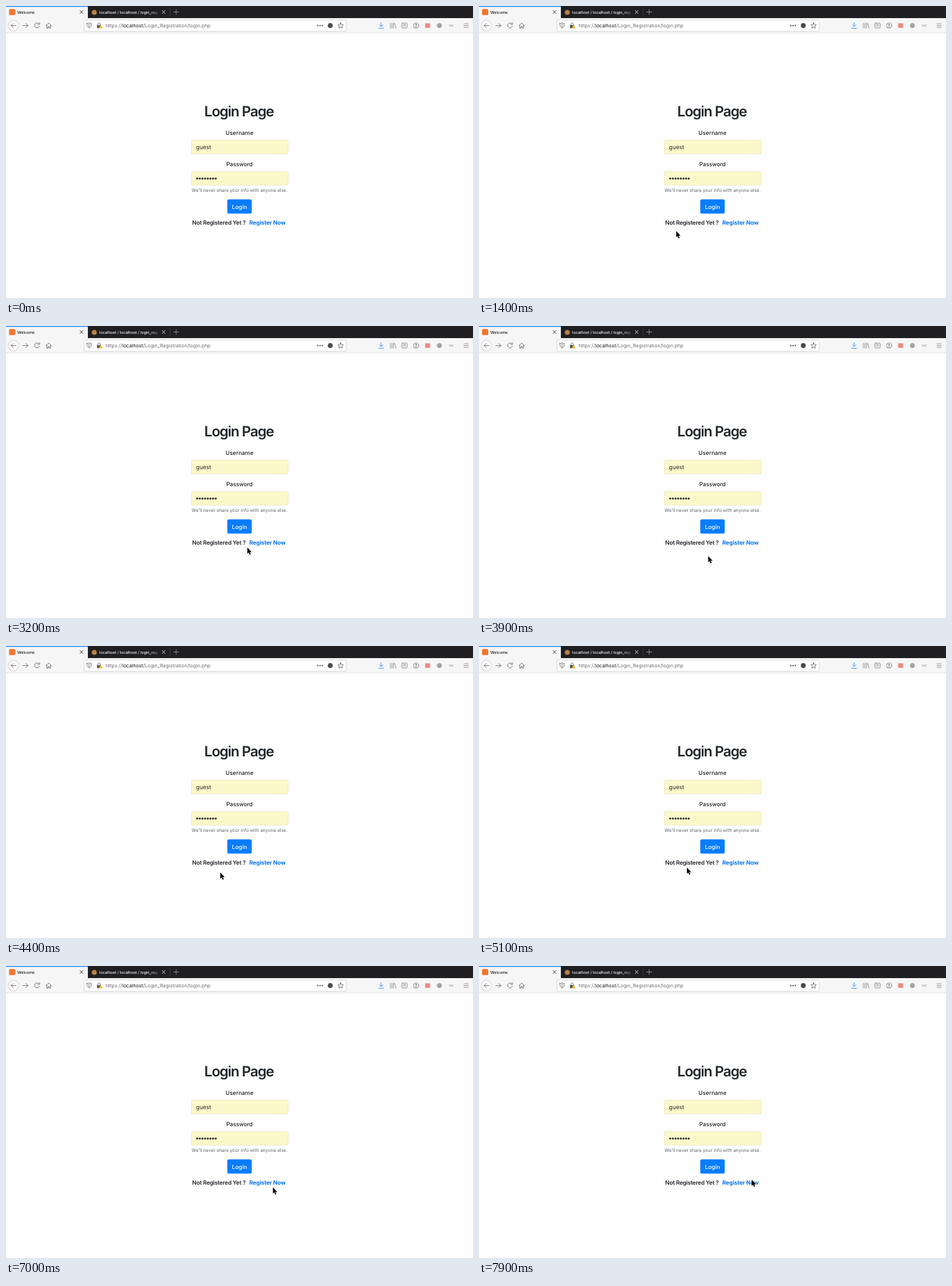
An HTML page for the animation above (8000 ms loop, 656 by 410 pixels).

```html
<!DOCTYPE html>
<html lang="en">
<head>
<meta charset="utf-8">
<title>Login Page</title>
<style>
  html, body { margin: 0; width: 100%; height: 100%; overflow: hidden; background: #fefefe; }
  svg { display: block; width: 100vw; height: 100vh; font-family: Inter, "Open Sans", sans-serif; text-rendering: geometricPrecision; }
  .mid { text-anchor: middle; }
  .line { fill: none; stroke: #66666a; stroke-width: .8; stroke-linecap: round; stroke-linejoin: round; }
  .pale { stroke: #89898d; }
  .field { fill: #fdf8c9; stroke: #e4e0bd; stroke-width: .6; }
</style>
</head>
<body>
<svg viewBox="0 0 656 410" xmlns="http://www.w3.org/2000/svg">
  <defs>
    <linearGradient id="fade" gradientUnits="userSpaceOnUse" x1="203" x2="216">
      <stop offset="0" stop-color="#f4f4f5"/>
      <stop offset="1" stop-color="#f4f4f5" stop-opacity="0"/>
    </linearGradient>
  </defs>
  <rect width="656" height="410" fill="#fefefe"/>

  <!-- tab strip -->
  <rect width="656" height="17" fill="#1f1f21"/>
  <rect width="115" height="17" fill="#f6f6f7"/>
  <rect width="115" height="1.2" fill="#1688f5"/>
  <path d="M230.5 2V15" stroke="#48484b" stroke-width=".6"/>
  <rect x="4.300" y="4.200" width="8.600" height="8.600" rx="1.5" fill="#f2762b"/>
  <circle cx="124" cy="9" r="3.500" fill="#b98242"/>
  <g font-size="5.5" font-weight="500">
    <text x="16" y="10.900" fill="#17171a" letter-spacing="-.03">Welcome</text>
    <text x="131" y="10.900" fill="url(#fade)">localhost / localhost / login_reg</text>
  </g>
  <path class="line" d="M104 6.500l4 4m0-4l-4 4" style="stroke:#222"/>
  <path class="line" d="M219.500 6.500l4 4m0-4l-4 4" style="stroke:#eee"/>
  <path class="line" d="M235.500 8.500h7m-3.500-3.500v7" style="stroke:#aaa;stroke-width:.7"/>

  <!-- toolbar -->
  <rect y="17" width="656" height="21" fill="#f6f6f7"/>
  <path d="M0 38H656" stroke="#dededf" stroke-width=".7"/>
  <circle cx="10.500" cy="27.500" r="7.500" fill="#fbfbfb" stroke="#c3c3c6" stroke-width=".6"/>
  <g class="line">
    <path d="M14 27.500H7.200m3-3l-3 3 3 3"/>
    <path d="M23.500 27.500h7.300m-3-3l3 3-3 3"/>
    <path d="M46.700 25.500a3.500 3.500 0 1 0 .3 2.800M47 23.500v2.300h-2.300"/>
    <path d="M56.200 27.500l3.800-3.600 3.800 3.600M57.300 27v4.200h1.800v-2.400h1.800v2.400h1.800V27"/>
  </g>
  <rect x="109.500" y="19.500" width="368.500" height="16" rx="1.5" fill="#fff" stroke="#cfcfd2" stroke-width=".7"/>
  <g class="line">
    <path d="M113.500 24.500q1.800 0 3.200-.8 1.400.8 3.200.8 0 5-3.200 6.700-3.200-1.700-3.200-6.700z"/>
    <path d="M116.700 25.300v4.200"/>
    <path d="M129 27v-1.400a1.800 1.800 0 0 1 3.600 0V27"/>
  </g>
  <rect x="127.800" y="26.800" width="6" height="4.500" rx=".7" fill="#57575a"/>
  <path d="M133.300 26.500l2.800 5h-5.600z" fill="#f4b000" stroke="#fff" stroke-width=".4"/>
  <text x="140" y="30" font-size="6.850" fill="#6b6b70">https://<tspan fill="#111113">localhost</tspan>/Login_Registration/login.php</text>
  <g fill="#4a4a4e">
    <circle cx="438" cy="27.500" r="1"/><circle cx="441.200" cy="27.500" r="1"/><circle cx="444.400" cy="27.500" r="1"/>
    <circle cx="455.500" cy="27.500" r="3.400"/>
  </g>
  <path id="star" class="line"/>
  <path class="line" d="M527 23.500v5.200m-2.300-2.200l2.300 2.300 2.300-2.300M523.700 31.300h6.600" style="stroke:#4a9df2;stroke-width:1"/>
  <g class="line pale">
    <path d="M540 24v7m2.200-7v7m2.200-7v7m1.400-6.700l2 6.700"/>
    <rect x="556" y="24" width="7.500" height="6.800" rx="1"/>
    <path d="M558 26h3.500m-3.500 2h3.500"/>
    <circle cx="576" cy="27.500" r="3.800"/>
    <circle cx="576" cy="26.500" r="1.200"/>
    <path d="M573.600 30q2.400-2 4.800 0"/>
    <path d="M643.200 25h6.200m-6.200 2.500h6.200m-6.200 2.500h6.200"/>
  </g>
  <rect x="588.800" y="24.300" width="7" height="6.400" fill="#e98a80"/>
  <circle cx="608.800" cy="27.500" r="3.400" fill="#a3a3a7"/>
  <rect x="622" y="26" width="7" height="3" rx="1" fill="#d3d3d6"/>

  <!-- login form -->
  <g class="mid" fill="#212529" font-size="8" font-weight="500">
    <text x="327.200" y="154.500" font-size="20" font-weight="600" letter-spacing="-.98">Login Page</text>
    <text x="328" y="180.700">Username</text>
    <text x="328" y="224.700" letter-spacing="-.08">Password</text>
    <text x="328" y="261" font-size="6.400" font-weight="400" fill="#5f666d">We'll never share your info with anyone else.</text>
  </g>
  <rect class="field" x="260.300" y="188.300" width="136" height="19.400" rx="2"/>
  <rect class="field" x="260.300" y="232.300" width="136" height="19.400" rx="2"/>
  <text x="267" y="200.700" font-size="8" fill="#25282c">guest</text>
  <g id="dots" fill="#222529"></g>
  <rect x="310.800" y="271.600" width="34.400" height="19.800" rx="2" fill="#087cfb"/>
  <text class="mid" x="328" y="284.500" font-size="8" font-weight="500" fill="#fff">Login</text>
  <g font-size="8">
    <text x="261.500" y="307.300" font-weight="600" letter-spacing="-.15" fill="#212529">Not Registered Yet ?</text>
    <text x="341.800" y="307.300" font-weight="700" letter-spacing="-.1" fill="#0b76ef">Register Now</text>
  </g>

  <path id="cursor" d="M0 0V8.700L2 7 3.300 10.200 4.900 9.500 3.500 6.400H6.200Z" fill="#080808" stroke="#fff" stroke-width=".6" paint-order="stroke"/>
</svg>
<script>
  const LOOP = 8000, STEP = 100, APPEAR = 800;
  const byId = id => document.getElementById(id);

  // time, x, y of the pointer tip
  const path = [
    [800, 292, 324], [1400, 277, 316], [1700, 283, 314], [2300, 362, 312],
    [2800, 353, 322], [3200, 339, 311], [3400, 339, 311], [3900, 322, 323],
    [4400, 301, 318], [4700, 285, 322], [5100, 292, 311], [5700, 367, 308],
    [5900, 367, 308], [6300, 374, 308], [6700, 394, 306], [7100, 370, 312],
    [7400, 358, 304], [7700, 380, 294], [7900, 383, 300]
  ];

  function pointerAt(t) {
    const last = path.length - 1;
    let i = 0;
    while (i < last - 1 && t >= path[i + 1][0]) i++;
    const a = path[i], b = path[i + 1];
    const u = Math.min(1, Math.max(0, (t - a[0]) / (b[0] - a[0])));
    const ease = u * u * (3 - 2 * u);
    const k = (u + ease) / 2;
    return [1, 2].map(n => a[n] + (b[n] - a[n]) * k);
  }

  function draw(t) {
    const tick = Math.floor(t / STEP) * STEP;
    const [x, y] = pointerAt(tick);
    byId("cursor").setAttribute("transform", `translate(${x.toFixed(2)} ${y.toFixed(2)})`);
    byId("cursor").style.visibility = tick < APPEAR ? "hidden" : "visible";
  }

  const starPoints = Array.from({ length: 10 }, (_, i) => {
    const r = i % 2 ? 1.9 : 4.2, a = (i / 5 - .5) * Math.PI;
    return `${(470 + r * Math.cos(a)).toFixed(2)} ${(27.6 + r * Math.sin(a)).toFixed(2)}`;
  });
  byId("star").setAttribute("d", `M${starPoints.join("L")}Z`);
  byId("dots").innerHTML = Array.from({ length: 8 }, (_, i) =>
    `<circle cx="${268.6 + i * 3.72}" cy="242.300" r="1.350"/>`).join("");

  const start = performance.now();
  function frame() {
    draw((performance.now() - start) % LOOP);
    requestAnimationFrame(frame);
  }
  frame();
</script>
</body>
</html>
```
